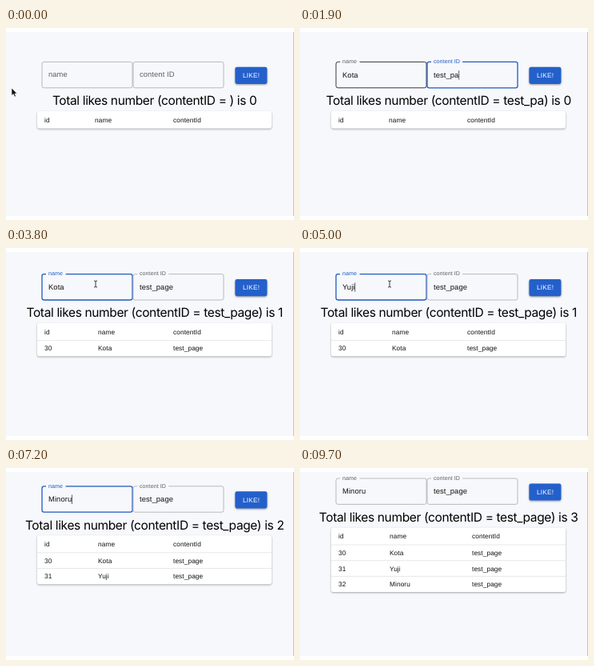
These frames come from a looping animation (360 px wide and 240 px high, 10 s). An HTML page:

```html
<!DOCTYPE html>
<html lang="en">
<head>
<meta charset="utf-8">
<title>Like counter</title>
<style>
  html, body { margin: 0; width: 100%; height: 100%; overflow: hidden; background: #fff; }
  svg { display: block; width: 360px; height: 240px; text-rendering: geometricPrecision; }
  text { font-family: "Liberation Sans", Arial, sans-serif; fill: #111; white-space: pre; }
  .head { font: 15.5px Inter, sans-serif; letter-spacing: -.36px; text-anchor: middle; fill: #000; }
  .cell { font-size: 8.3px; letter-spacing: .09px; }
  .value { font-size: 9.4px; letter-spacing: .09px; }
  .like { font-size: 8.2px; letter-spacing: .23px; font-weight: 500; fill: #fff; }
  .card { fill: #fff; filter: drop-shadow(0 1px 1px #0005); }
  .button { fill: #2460cb; filter: drop-shadow(0 1px 1px #0006); }
  .button.over { fill: #1c4bab; filter: drop-shadow(0 2px 2px #0006) drop-shadow(0 2px 3px #0004); }
</style>
</head>
<body>
<svg id="stage" viewBox="0 0 360 240"></svg>
<script>
const LOOP = 10000, STEP = 100;
const BG = '#f7f8fc', BLUE = '#1f5bc0';
const NAMES = ['Kota', 'Yuji', 'Minoru'];
const ADDED = [2900, 5400, 8400];
const COLUMNS = [[48, 111, 209], [48, 115, 209], [48, 115, 209], [48, 112, 215]];

// Pointer moves: start, arrival, hidden after, from x, y, to x, y
const MOVES = [
  [0, 250, 400, 7, 75, 110, 58],
  [2200, 2600, 3400, 110, 58, 312, 54],
  [3400, 3700, 4000, 312, 54, 112, 45],
  [5000, 5200, 5700, 112, 45, 312, 45],
  [5700, 5900, 6300, 312, 45, 110, 47],
  [7400, 8000, 8300, 110, 47, 312, 40],
  [8300, 8400, 8500, 312, 40, 344, 50]
];
const POINTERS = {
  arrow: '<path d="M0 0V9.5L2.2 7.5L3.8 11L5.4 10.3L3.9 7H6.8Z" fill="#111" stroke="#fff" stroke-width=".6"/>',
  beam: '<path d="M-2-4Q0-4 0-3Q0-4 2-4M0-3V3M-2 4Q0 4 0 3Q0 4 2 4" fill="none" stroke="#222" stroke-width=".9"/>',
  hand: '<path d="M-1 0Q0-1 1 0V3.4L5 4.4Q6 5 5.6 7L4.6 10H-.4L-3.4 6Q-3.4 4.6-1 6Z" fill="#fff" stroke="#111" stroke-width=".8"/>'
};

const stage = document.getElementById('stage');
const pen = document.createElement('canvas').getContext('2d');
pen.font = '9.4px "Liberation Sans", Arial, sans-serif';

const clamp = v => Math.max(0, Math.min(1, v));
const within = (t, a, b) => t >= a && t < b;
const text = (cls, x, y, str) => `<text class="${cls}" x="${x}" y="${y}">${str}</text>`;
const typed = (word, t, start) => word.slice(0, Math.max(0, Math.floor((t - start) / STEP) + 1));
const erased = (word, t, start) => word.slice(0, Math.max(0, word.length - 1 - Math.floor((t - start) / STEP)));

function nameAt(t) {
  if (t < 4000) return typed(NAMES[0], t, 400);
  if (t < 4600) return erased(NAMES[0], t, 4000);
  if (t < 6300) return typed(NAMES[1], t, 4600);
  if (t < 6700) return erased(NAMES[1], t, 6300);
  return typed(NAMES[2], t, 6700);
}

function pointerAt(t) {
  const [start, end, hide, x0, y0, x1, y1] = MOVES.findLast(m => t >= m[0]);
  const u = clamp((t - start) / (end - start)), k = u * u * (3 - 2 * u);
  return { x: x0 + (x1 - x0) * k, y: y0 + (y1 - y0) * k, shown: t < hide };
}

function field(x, top, label, value, { float, focus, hover, caret }) {
  const size = 9.4 * (1 - .25 * float);
  const gap = pen.measureText(label).width * .75 + 7;
  const stroke = focus ? BLUE : hover ? '#222' : '#b2b3b7';
  const caretX = x + 8.3 + pen.measureText(value).width + .09 * value.length;
  return `<rect x="${x}" y="${top + .3}" width="113" height="32.4" rx="2.4" fill="none"
      stroke="${stroke}" stroke-width="${focus ? 1.3 : .9}"/>` +
    (float > .9 ? `<rect x="${x + 5}" y="${top - 1}" width="${gap}" height="3" fill="${BG}"/>` : '') +
    `<text x="${x + 8}" y="${top + 19.3 - 17.2 * float}" letter-spacing=".08"
      style="font-size:${size}px;fill:${focus ? BLUE : '#606060'}">${label}</text>` +
    text('value', x + 8, top + 19.7, value) +
    (caret ? `<path d="M${caretX} ${top + 11}v11.5" stroke="#222" stroke-width=".7"/>` : '');
}

function table(n, top) {
  const cols = COLUMNS[n];
  const row = (cells, y) => cells.map((c, i) => text('cell', cols[i], y, c)).join('');
  let out = `<rect class="card" x="39" y="${top}" width="293" height="${21.5 + 19.7 * n}" rx="2.4"/>` +
    row(['id', 'name', 'contentId'], top + 13.7);
  for (let i = 0; i < n; i++) {
    const y = top + 21.5 + 19.7 * i;
    out += `<path d="M39 ${y}H332" stroke="#dedee0" stroke-width=".7"/>` +
      row([30 + i, NAMES[i], 'test_page'], y + 12.8);
  }
  return out;
}

function draw(t) {
  const n = ADDED.filter(a => t >= a).length;
  const top = 42.1 - 9.8 * n;
  const content = typed('test_page', t, 1300);
  const p = pointerAt(t);
  const onRow = p.y > top && p.y < top + 33;
  const overName = onRow && within(p.x, 45, 158);
  const overContent = onRow && within(p.x, 159, 272);
  const overButton = within(p.x, 286, 327) && within(p.y, top + 6, top + 29);
  const nameFocus = within(t, 260, 860) || within(t, 3750, 5250) || within(t, 6050, 8100);
  const contentFocus = within(t, 860, 2650);
  const float = start => 1 - (1 - clamp((t - start) / 200)) ** 3;
  const kind = overButton ? 'hand' : overName || overContent ? 'beam' : 'arrow';

  stage.innerHTML =
    `<rect y="5" width="360" height="230" fill="${BG}"/>
     <path d="M359.5 5V235" stroke="#a8d8a0"/>` +
    field(45, top, 'name', nameAt(t), {
      float: float(260), focus: nameFocus, hover: overName,
      caret: within(t, 300, 860) || within(t, 4000, 5200) || within(t, 6300, 7600)
    }) +
    field(159, top, 'content ID', content, {
      float: float(860), focus: contentFocus, hover: overContent, caret: contentFocus
    }) +
    `<rect class="button ${overButton ? 'over' : ''}" x="286.4" y="${top + 6.7}" width="40" height="21.2" rx="2.4"/>` +
    text('like', 296, top + 20, 'LIKE!') +
    text('head', 185.7, top + 54, `Total likes number (contentID = ${content}) is ${n}`) +
    table(n, top + 61.8) +
    (p.shown ? `<g transform="translate(${p.x} ${p.y})">${POINTERS[kind]}</g>` : '');
}

const begin = performance.now();
function tick() {
  const t = (performance.now() - begin) % LOOP;
  draw(Math.floor(t / STEP) * STEP);
  requestAnimationFrame(tick);
}
tick();
</script>
</body>
</html>
```
